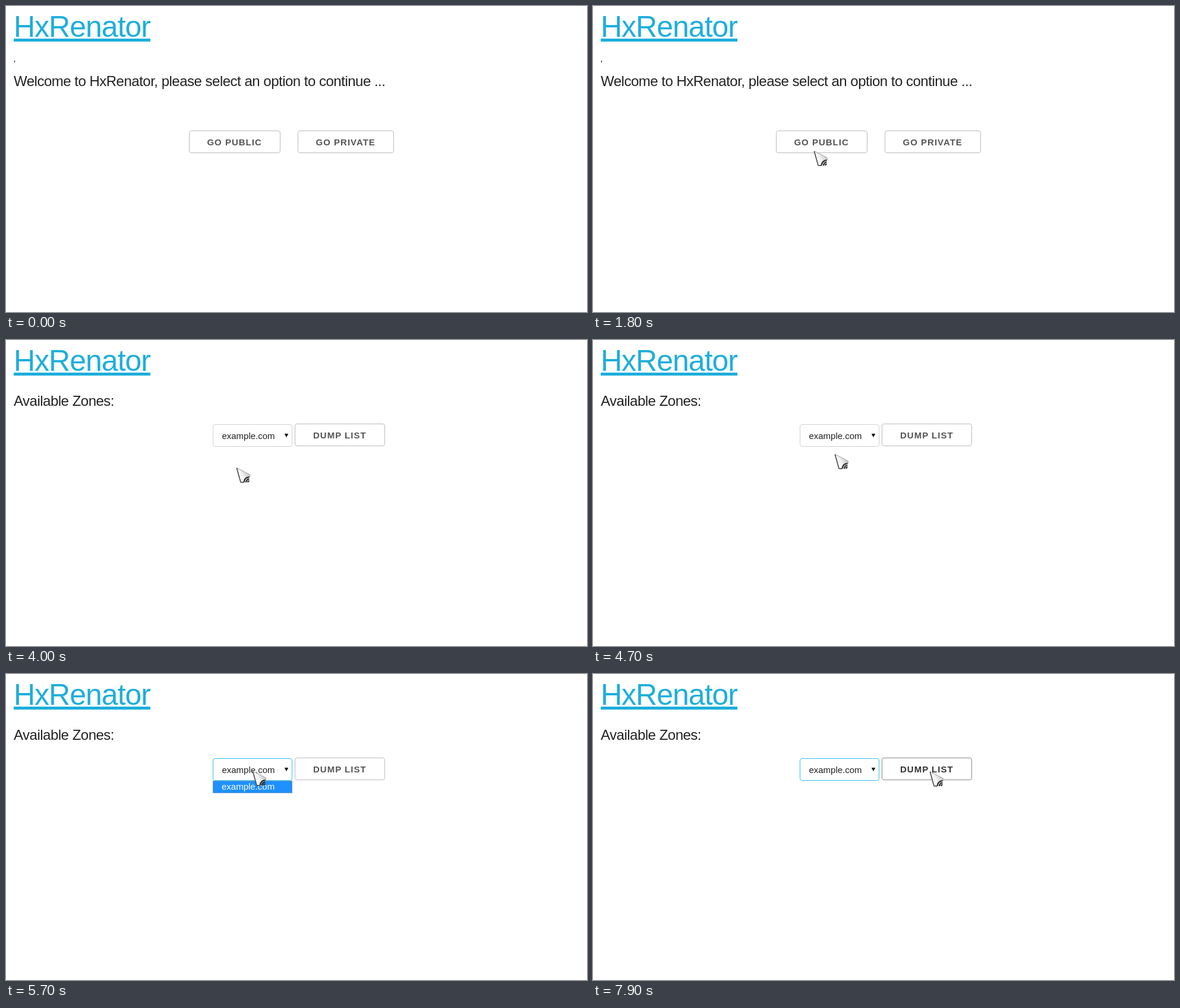
Write an HTML page with a canvas that moves like this. It is 978 px wide and 516 px high and loops after 8000 ms.

```html
<!DOCTYPE html>
<html lang="en">
<head>
<meta charset="utf-8">
<title>Zone tool</title>
<style>
  html, body { margin: 0; width: 100%; height: 100%; overflow: hidden; background: #fff; }
  #stage { position: absolute; left: 0; top: 0; width: 978px; height: 516px; overflow: hidden;
    font-family: "Liberation Sans", Arial, sans-serif; color: #222; }
  #stage div, canvas { position: absolute; }
  .page { left: 0; top: 0; width: 978px; height: 516px; }
  .text { white-space: pre; }
  .box { box-sizing: border-box; border: 1px solid #bbb; border-radius: 4px; }
  .title { color: #1eaedb; letter-spacing: -1px; }
  .rule { background: #1eaedb; }
  .heading { letter-spacing: -.5px; }
  .label { color: #555; font-weight: 600; letter-spacing: 1px; }
  .hover .box { border-color: #888; }
  .hover .label { color: #333; }
  .select { border-color: #d1d1d1; }
  .select.focus { border-color: #33c3f0; }
  .option { background: #1e90ff; border: 1px solid #6f9cc8; box-sizing: border-box; }
  .light { color: #fff; }
  canvas { left: 0; top: 0; }
</style>
</head>
<body>
<div id="stage"></div>
<script>
const LOOP = 8000, STEP = 100;
const stage = document.getElementById('stage');

function add(parent, className) {
  const el = document.createElement('div');
  el.className = className;
  parent.append(el);
  return el;
}

function rect(parent, className, x, y, w, h) {
  const el = add(parent, className);
  el.style.cssText = `left:${x}px;top:${y}px;width:${w}px;height:${h}px`;
  return el;
}

// Places text by its baseline.
function text(parent, className, string, x, baseline, size) {
  const el = add(parent, 'text ' + className);
  const ascent = Math.round(size * .905), descent = Math.round(size * .212);
  el.textContent = string;
  el.style.cssText = `left:${x}px;top:${baseline - ascent}px;` +
    `font-size:${size}px;line-height:${ascent + descent}px`;
  return el;
}

function button(parent, string, x, y, w, textX) {
  const el = add(parent, 'button');
  rect(el, 'box', x, y, w, 38);
  text(el, 'label', string, textX, y + 25, 15);
  return el;
}

rect(stage, 'rule', 13, 55, 230, 5);
text(stage, 'title', 'HxRenator', 13, 52, 50);

const welcome = add(stage, 'page');
text(welcome, '', "'", 13, 102, 15);
text(welcome, 'heading', 'Welcome to HxRenator, please select an option to continue ...', 13, 135, 24);
const goPublic = button(welcome, 'GO PUBLIC', 308, 210, 154, 338.4);
button(welcome, 'GO PRIVATE', 491, 210, 162, 521.6);

const zones = add(stage, 'page');
text(zones, 'heading', 'Available Zones:', 13, 111, 24);
const select = rect(zones, 'box select', 348, 142, 134, 38);
text(zones, '', 'example.com', 363.4, 167, 15);
const dump = button(zones, 'DUMP LIST', 486, 141, 152, 517);
const menu = add(zones, 'menu');
rect(menu, 'option', 348, 180, 134, 21);
text(menu, 'light', 'example.com', 363, 195, 15);

const canvas = document.createElement('canvas');
canvas.width = 978;
canvas.height = 516;
stage.append(canvas);
const ctx = canvas.getContext('2d');

// Pointer keys: time, x, y
const path = [
  [500, 572, 447], [600, 480, 382], [700, 400, 325], [800, 371, 304],
  [1400, 371, 304], [1500, 371, 298], [1700, 371, 259], [1800, 371, 244],
  [2000, 371, 236], [2300, 371, 232], [3500, 371, 232], [4400, 400, 202],
  [4700, 406, 192], [5200, 414, 163], [7500, 414, 163], [7600, 433, 163],
  [7700, 490, 163], [7800, 546, 164], [7900, 566, 164]
];

function pointerAt(t) {
  const next = path.findIndex(key => key[0] > t);
  if (next < 0) return path[path.length - 1].slice(1);
  const [t0, x0, y0] = path[next - 1], [t1, x1, y1] = path[next];
  const k = (t - t0) / (t1 - t0);
  return [Math.round(x0 + (x1 - x0) * k), Math.round(y0 + (y1 - y0) * k)];
}

function trace(...points) {
  ctx.beginPath();
  points.forEach(([x, y]) => ctx.lineTo(x, y));
}

function drawPointer(x, y) {
  ctx.save();
  ctx.translate(x, y);
  ctx.lineJoin = 'round';
  const shade = ctx.createLinearGradient(4, 14, 18, 8);
  shade.addColorStop(0, '#fff');
  shade.addColorStop(.5, '#f1f1f1');
  shade.addColorStop(1, '#d2d2d2');
  trace([1.5, .8], [23.2, 12], [23.4, 16], [17, 19], [13.5, 24.8], [8.2, 24.6]);
  ctx.closePath();
  ctx.fillStyle = shade;
  ctx.fill();
  ctx.strokeStyle = '#999';
  ctx.lineWidth = 1;
  ctx.stroke();
  trace([1.3, .8], [8, 24.7], [13, 25.2]);
  ctx.strokeStyle = '#484848';
  ctx.lineWidth = 1.5;
  ctx.stroke();

  // Striped lower corner
  ctx.strokeStyle = '#303030';
  ctx.lineWidth = 2.2;
  for (const radius of [9, 5.6, 2.4]) {
    ctx.beginPath();
    ctx.arc(22.5, 25, radius, Math.PI * .99, Math.PI * 1.5);
    ctx.stroke();
  }
  ctx.restore();
}

function draw(t) {
  const onZones = t >= 3400;
  welcome.style.display = onZones ? 'none' : '';
  zones.style.display = onZones ? '' : 'none';
  goPublic.classList.toggle('hover', t >= 1900);
  dump.classList.toggle('hover', t >= 7700);
  select.classList.toggle('focus', t >= 5600);
  menu.style.opacity = t < 5600 || t >= 6900 ? 0 : t < 5700 ? .5 : t < 6800 ? 1 : .85;

  ctx.clearRect(0, 0, 978, 516);
  if (onZones) {
    trace([468.8, 158], [475.2, 158], [472, 164.3]);
    ctx.fillStyle = '#111';
    ctx.fill();
  }
  if (t >= 500) drawPointer(...pointerAt(t));
}

let shown = -1;
function tick() {
  const t = Math.floor(performance.now() % LOOP / STEP) * STEP;
  if (t !== shown) draw(shown = t);
  requestAnimationFrame(tick);
}
tick();
</script>
</body>
</html>
```
